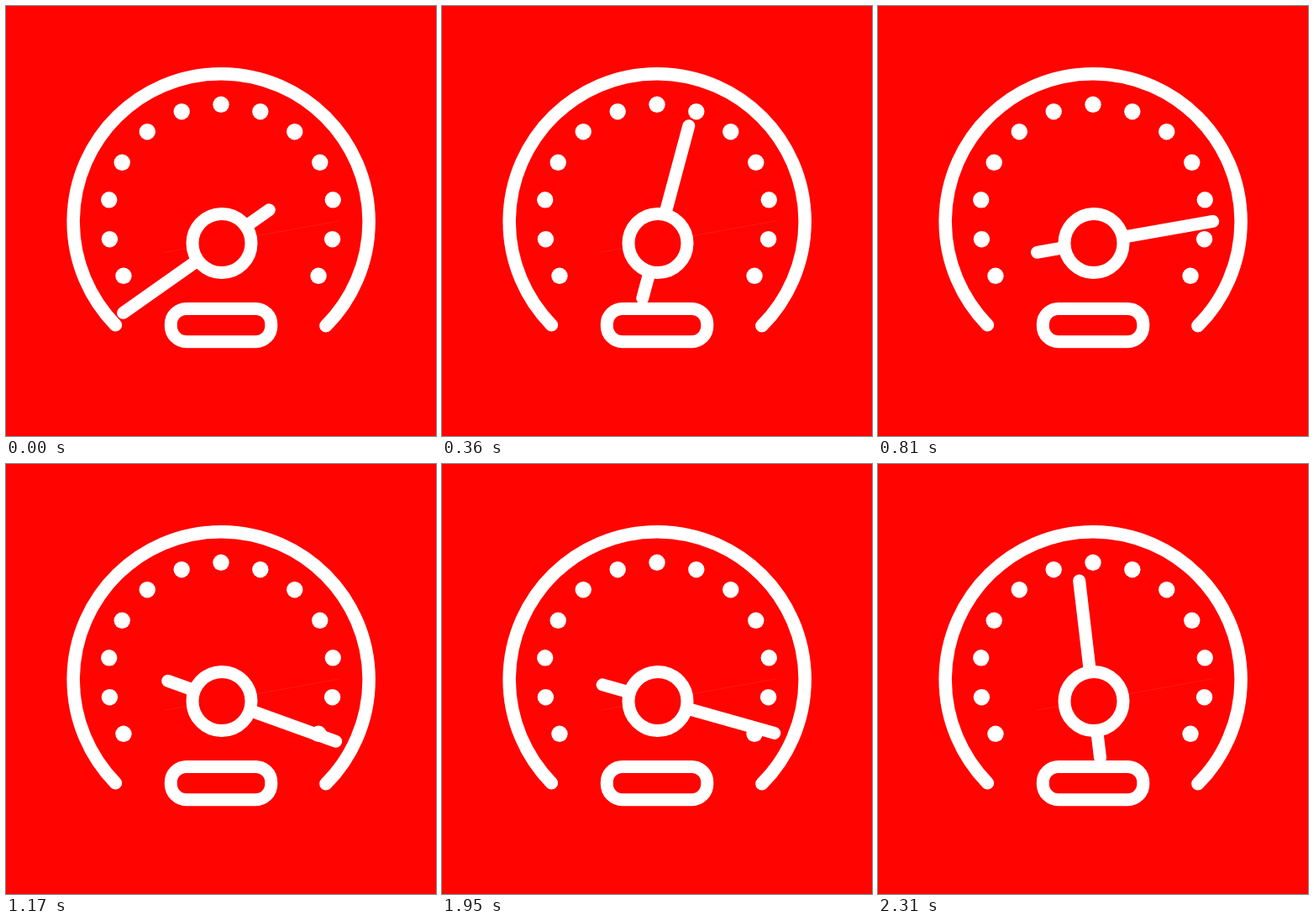
Animation, 512 px wide and 512 px high, one loop 2340 ms. Source, as an HTML page:

```html
<!DOCTYPE html>
<html lang="en">
<head>
<meta charset="utf-8">
<title>Gauge</title>
<style>
  html, body { margin: 0; width: 100%; height: 100%; overflow: hidden; background: #ff0400; }
  svg { display: block; width: 100%; height: 100%; }
</style>
</head>
<body>
<svg viewBox="0 0 512 512" fill="none" stroke="#fff" stroke-width="15" stroke-linecap="round">
  <path d="M190 293 397 256" stroke-width=".6" opacity=".14"/>
  <path d="M130.4 379.8A176 176 0 1 1 380.9 380.8" stroke-width="15.5"/>
  <g id="dots" fill="#fff" stroke="none"></g>
  <path id="needle" d="M-68.5-.5H144"/>
  <circle cx="257" cy="282.5" r="35" fill="#ff0400"/>
  <rect x="196.3" y="360.4" width="119.5" height="39.3" rx="18.5"/>
</svg>
<script>
  const LOOP = 2340, STEP = 30;
  const dots = document.getElementById('dots');
  const needle = document.getElementById('needle');

  // Thirteen dots, 20 degrees apart, on a ring slightly wider at the top
  for (let deg = -120; deg <= 120; deg += 20) {
    const a = deg * Math.PI / 180, r = 135 + 2 * Math.cos(a);
    const x = 256 + r * Math.sin(a), y = 254.3 - r * Math.cos(a);
    dots.innerHTML += `<circle cx="${x}" cy="${y}" r="9.7"/>`;
  }

  // Progress from 0 to 1 between two times
  const ramp = (t, from, to) => Math.min(1, Math.max(0, (t - from) / (to - from)));

  // Needle angle in degrees, clockwise from the right
  const angleAt = t => -215.2
    + 214.2 * ramp(t, 0, 550)            // sweep up
    - 9 * ramp(t, 550, 810)              // ease off
    + 29.8 * ramp(t, 810, 1170) ** 3     // accelerate
    - 8 * ramp(t, 1170, 1650)            // hover
    + 3.9 * ramp(t, 1650, 1950)
    - 121.8 * ramp(t, 1950, LOOP);       // fall back

  function draw() {
    const t = Math.floor(performance.now() % LOOP / STEP) * STEP;
    needle.setAttribute('transform', `translate(257 281.9) rotate(${angleAt(t)})`);
    requestAnimationFrame(draw);
  }
  draw();
</script>
</body>
</html>
```
